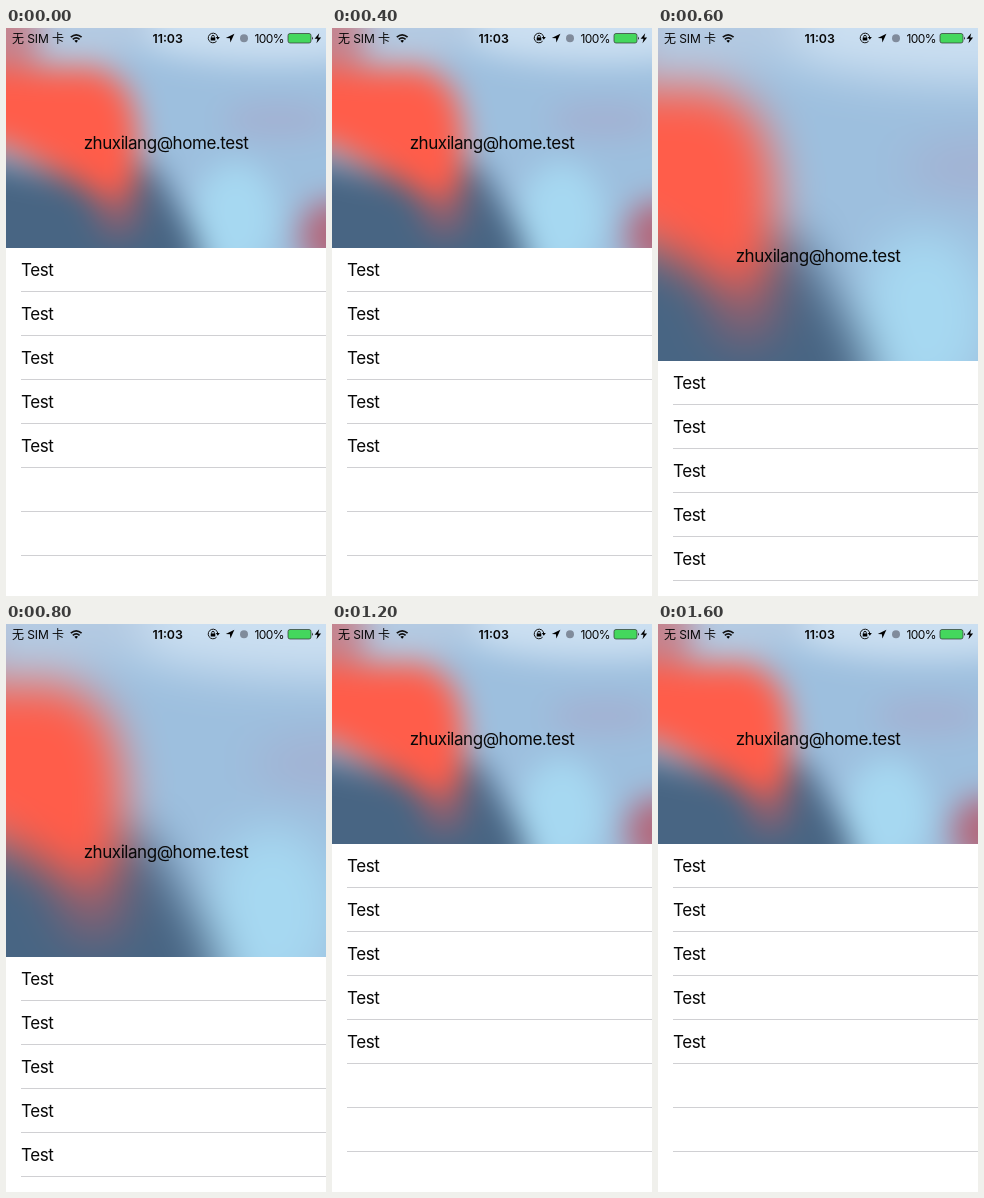
Animation of 320x568 px, one loop 1700 ms. Source, as an HTML page:

```html
<!DOCTYPE html>
<html lang="zh">
<meta charset="utf-8">
<title>Stretchy header</title>
<style>
  html, body { margin: 0; height: 100%; overflow: hidden; background: #fff; }
  svg { display: block; width: 100vw; height: 100vh; }
  text { font: 17px Inter, "Noto Sans CJK SC", "Noto Sans CJK", sans-serif; letter-spacing: -.45px; fill: #080808; }
  #status text { font-size: 12px; letter-spacing: -.1px; }
  #status .time { font-size: 12.4px; font-weight: 600; letter-spacing: 0; }
  #status .charge { letter-spacing: -.6px; }
  .line { fill: none; stroke: #111; }
</style>
<svg viewBox="0 0 320 568">
  <defs>
    <filter id="soft" filterUnits="userSpaceOnUse" x="-80" y="-80" width="480" height="400" color-interpolation-filters="sRGB">
      <feGaussianBlur stdDeviation="15"/>
    </filter>
  </defs>

  <g id="art">
    <g filter="url(#soft)">
      <path fill="#9dbfde" d="M-80-80H400V320H-80z"/>
      <ellipse cx="270" cy="-8" rx="170" ry="44" fill="#cbdff1"/>
      <ellipse cx="75" cy="-8" rx="75" ry="40" fill="#b4cae2"/>
      <ellipse cx="-10" cy="8" rx="44" ry="50" fill="#c4848f"/>
      <ellipse cx="272" cy="92" rx="56" ry="18" fill="#a3b1d2"/>
      <ellipse cx="230" cy="190" rx="42" ry="56" fill="#a6d8f1"/>
      <path fill="#486583" d="M-80 120L60 150 146 135 192 215 200 300H-80z"/>
      <ellipse cx="112" cy="180" rx="22" ry="28" fill="#8d6070"/>
      <path fill="#ff5d4a" d="M-80 40H95L122 62 132 100 130 160 102 174 62 150 0 118-80 105z"/>
      <ellipse cx="326" cy="208" rx="32" ry="36" fill="#b2687c"/>
    </g>
  </g>

  <g id="content">
    <rect width="320" height="568" fill="#fff"/>
    <text x="160" y="-99" text-anchor="middle">zhuxilang@home.test</text>
  </g>

  <g id="status">
    <text x="6" y="14.5">无 SIM 卡</text>
    <g class="line" stroke-width="1.7">
      <path d="M64.8 9.2q5.4-4.8 10.8 0M66.8 11.3q3.4-3 6.8 0"/>
    </g>
    <path d="M68.4 12.8q1.8-1.4 3.6 0l-1.8 2z"/>
    <text class="time" x="161.7" y="14.5" text-anchor="middle">11:03</text>
    <path class="line" d="M210.6 13.2A4.8 4.8 0 1 1 211.8 9.4M205.7 9.8V8.6a1.3 1.3 0 0 1 2.6 0V9.8"/>
    <path d="M204.7 9.4h4.6v3.2h-4.6zM209.8 9h4l-2 2.8z"/>
    <path d="M228.4 5.8L219.8 9.9 223.9 10.3 224.4 14.4z"/>
    <circle cx="238" cy="10.3" r="4" fill="#808b9b"/>
    <text class="charge" x="248.6" y="14.5">100%</text>
    <rect x="282" y="5.5" width="23" height="9.5" rx="2" fill="#44d75d" stroke="#333" stroke-width=".7"/>
    <path d="M306 8.5q1.8 1.7 0 3.5zM313.2 5.2l-4.6 5.6h2.9l-1 4.4 4.6-5.8h-2.9z"/>
  </g>
</svg>
<script>
  const LOOP = 1700, STEP = 100, REST = 220, ROW = 44;
  const art = document.getElementById('art');
  const content = document.getElementById('content');

  let rows = '';
  for (let i = 0; i < 7; i++) {
    if (i < 5) rows += `<text x="15" y="${i * ROW + 28}">Test</text>`;
    rows += `<rect x="15" y="${(i + 1) * ROW - 1}" width="305" height="1" fill="#d0d0d3"/>`;
  }
  content.insertAdjacentHTML('beforeend', rows);

  // The header is pulled open, held, then snaps back.
  function headerHeight(step) {
    if (step === 5) return 322;
    return step > 5 && step < 9 ? 333 : REST;
  }

  function draw() {
    const height = headerHeight(Math.floor(performance.now() % LOOP / STEP));
    const scale = height / REST;
    art.setAttribute('transform', `translate(${160 * (1 - scale)} 0) scale(${scale})`);
    content.setAttribute('transform', `translate(0 ${height})`);
    requestAnimationFrame(draw);
  }
  draw();
</script>
</html>
```
